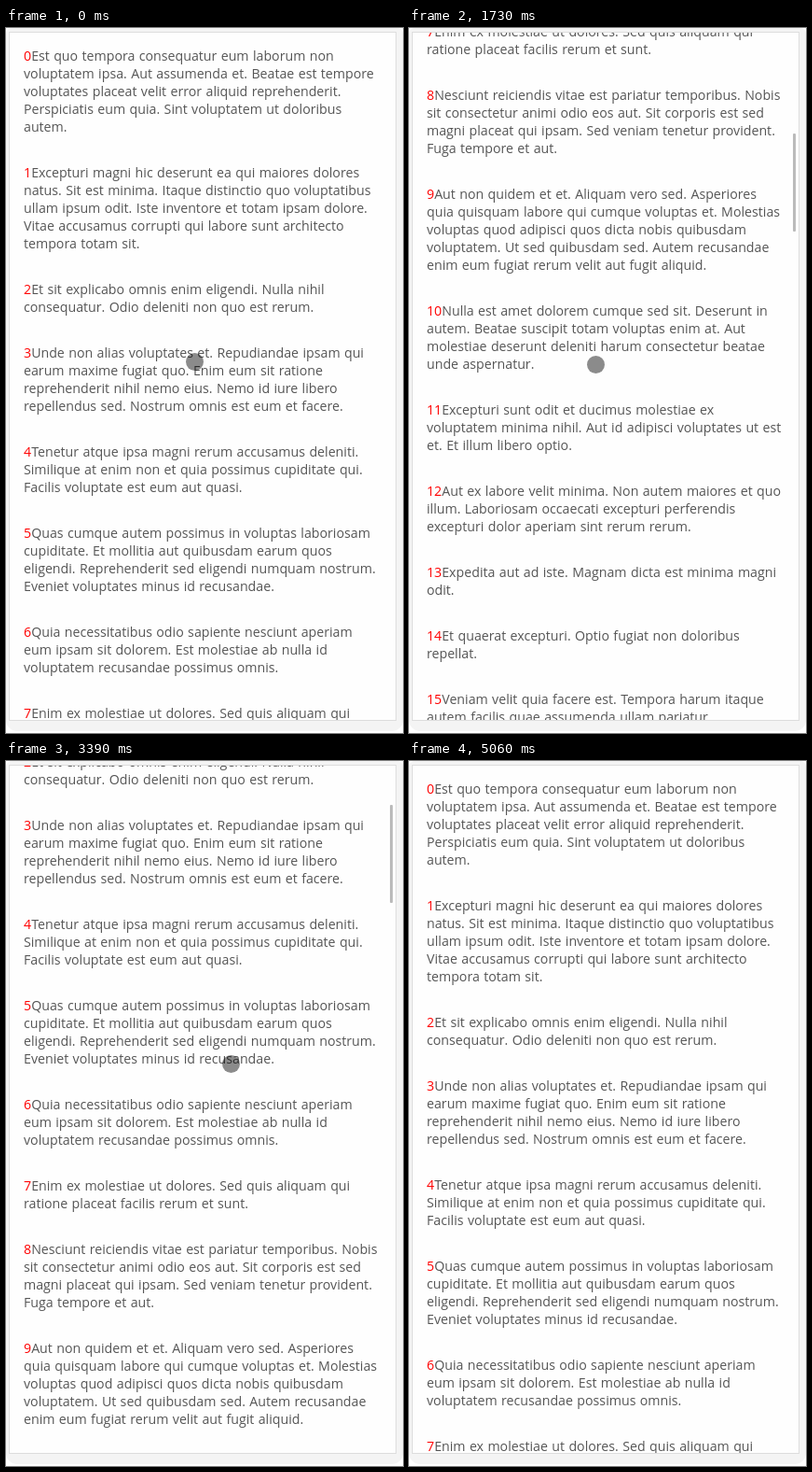
Animation of 426x755 px, one loop 5420 ms. Source, as an HTML page:

```html
<!DOCTYPE html>
<html lang="la">
<head>
<meta charset="utf-8">
<title>Scrolling list</title>
<style>
  html, body { margin: 0; width: 100%; height: 100%; overflow: hidden; background: #fff; }
  #frame { position: absolute; left: 0; top: 0; width: 426px; height: 753px; background: #f4f4f4; border-radius: 6px 6px 12px 12px; }
  #card { position: absolute; left: 3px; top: 4px; width: 414px; height: 736px; overflow: hidden; background: #fefefe; border: 1px solid #ddd; }
  #list { position: absolute; left: 15px; top: 15px; font: 14.2px/19px "Open Sans", "Noto Sans", sans-serif; word-spacing: .7px; color: #555; white-space: pre; }
  #list p { margin: 0 0 30px; }
  #list b { font-weight: 400; color: #f00; }
  #bar { position: absolute; left: 408px; top: 2px; width: 3px; height: 105px; border-radius: 1px; background: #bbb; }
  #touch { position: absolute; left: -9px; top: -9px; width: 19px; height: 19px; border-radius: 50%; background: rgba(0, 0, 0, .45); }
</style>
</head>
<body>
<div id="frame"></div>
<div id="card"><div id="list"></div><div id="bar"></div></div>
<div id="touch"></div>
<script>
const paragraphs = `Est quo tempora consequatur eum laborum non
voluptatem ipsa. Aut assumenda et. Beatae est tempore
voluptates placeat velit error aliquid reprehenderit.
Perspiciatis eum quia. Sint voluptatem ut doloribus
autem.

Excepturi magni hic deserunt ea qui maiores dolores
natus. Sit est minima. Itaque distinctio quo voluptatibus
ullam ipsum odit. Iste inventore et totam ipsam dolore.
Vitae accusamus corrupti qui labore sunt architecto
tempora totam sit.

Et sit explicabo omnis enim eligendi. Nulla nihil
consequatur. Odio deleniti non quo est rerum.

Unde non alias voluptates et. Repudiandae ipsam qui
earum maxime fugiat quo. Enim eum sit ratione
reprehenderit nihil nemo eius. Nemo id iure libero
repellendus sed. Nostrum omnis est eum et facere.

Tenetur atque ipsa magni rerum accusamus deleniti.
Similique at enim non et quia possimus cupiditate qui.
Facilis voluptate est eum aut quasi.

Quas cumque autem possimus in voluptas laboriosam
cupiditate. Et mollitia aut quibusdam earum quos
eligendi. Reprehenderit sed eligendi numquam nostrum.
Eveniet voluptates minus id recusandae.

Quia necessitatibus odio sapiente nesciunt aperiam
eum ipsam sit dolorem. Est molestiae ab nulla id
voluptatem recusandae possimus omnis.

Enim ex molestiae ut dolores. Sed quis aliquam qui
ratione placeat facilis rerum et sunt.

Nesciunt reiciendis vitae est pariatur temporibus. Nobis
sit consectetur animi odio eos aut. Sit corporis est sed
magni placeat qui ipsam. Sed veniam tenetur provident.
Fuga tempore et aut.

Aut non quidem et et. Aliquam vero sed. Asperiores
quia quisquam labore qui cumque voluptas et. Molestias
voluptas quod adipisci quos dicta nobis quibusdam
voluptatem. Ut sed quibusdam sed. Autem recusandae
enim eum fugiat rerum velit aut fugit aliquid.

Nulla est amet dolorem cumque sed sit. Deserunt in
autem. Beatae suscipit totam voluptas enim at. Aut
molestiae deserunt deleniti harum consectetur beatae
unde aspernatur.

Excepturi sunt odit et ducimus molestiae ex
voluptatem minima nihil. Aut id adipisci voluptates ut est
et. Et illum libero optio.

Aut ex labore velit minima. Non autem maiores et quo
illum. Laboriosam occaecati excepturi perferendis
excepturi dolor aperiam sint rerum rerum.

Expedita aut ad iste. Magnam dicta est minima magni
odit.

Et quaerat excepturi. Optio fugiat non doloribus
repellat.

Veniam velit quia facere est. Tempora harum itaque
autem facilis quae assumenda ullam pariatur.

Tenetur perspiciatis repellendus sit dignissimos eos
voluptas. Quia minus et omnis labore.

Sit nihil dolorem autem. Rerum quos et voluptatem
magni eum fugit.`.split("\n\n");

const LOOP = 5420, TICK = 10;
const [list, bar, touch] = ["list", "bar", "touch"].map(id => document.getElementById(id));
list.innerHTML = paragraphs.map((text, i) => `<p><b>${i}</b>${text}</p>`).join("");

// Each key: time in ms, value
const scroll = curve([[0, 0], [60, 0], [1170, 472], [1730, 730], [2200, 872], [2640, 781],
  [3390, 279], [3870, 76], [4460, 0]]);
const touchX = curve([[0, 202], [1170, 194], [1730, 200], [2640, 224], [3390, 241],
  [3870, 265], [4710, 267], [5060, 274]]);
const touchY = curve([[0, 357], [450, 250], [900, 390], [1170, 304], [1400, 250], [1730, 360],
  [2100, 270], [2400, 265], [2640, 302], [2950, 410], [3390, 324], [3870, 417], [4710, 440], [5060, 765]]);

// Monotone cubic through the keys, flat at turning points and ends
function curve(keys) {
  const rate = i => (keys[i + 1][1] - keys[i][1]) / (keys[i + 1][0] - keys[i][0]);
  const slopes = keys.map((_, i) => {
    if (i === 0 || i === keys.length - 1) return 0;
    const a = rate(i - 1), b = rate(i);
    return a * b > 0 ? 2 * a * b / (a + b) : 0;
  });
  return t => {
    const i = keys.findIndex(key => key[0] > t) - 1;
    if (i < 0) return keys[keys.length - 1][1];
    const [start, from] = keys[i], [end, to] = keys[i + 1];
    const span = end - start, u = (t - start) / span, v = 1 - u;
    return from * v * v * (1 + 2 * u) + to * u * u * (1 + 2 * v)
      + span * u * v * (slopes[i] * v - slopes[i + 1] * u);
  };
}

function draw() {
  const t = Math.round(performance.now() / TICK) * TICK % LOOP;
  const offset = Math.round(scroll(t));
  list.style.transform = `translateY(${-offset}px)`;
  bar.style.transform = `translateY(${Math.round(offset * .1447)}px)`;
  bar.style.opacity = t < 60 ? 0 : Math.max(0, Math.min(1, (5060 - t) / 350));
  touch.style.transform = `translate(${touchX(t)}px, ${touchY(t)}px)`;
  touch.style.visibility = t < 5060 ? "visible" : "hidden";
  requestAnimationFrame(draw);
}
draw();
</script>
</body>
</html>
```
